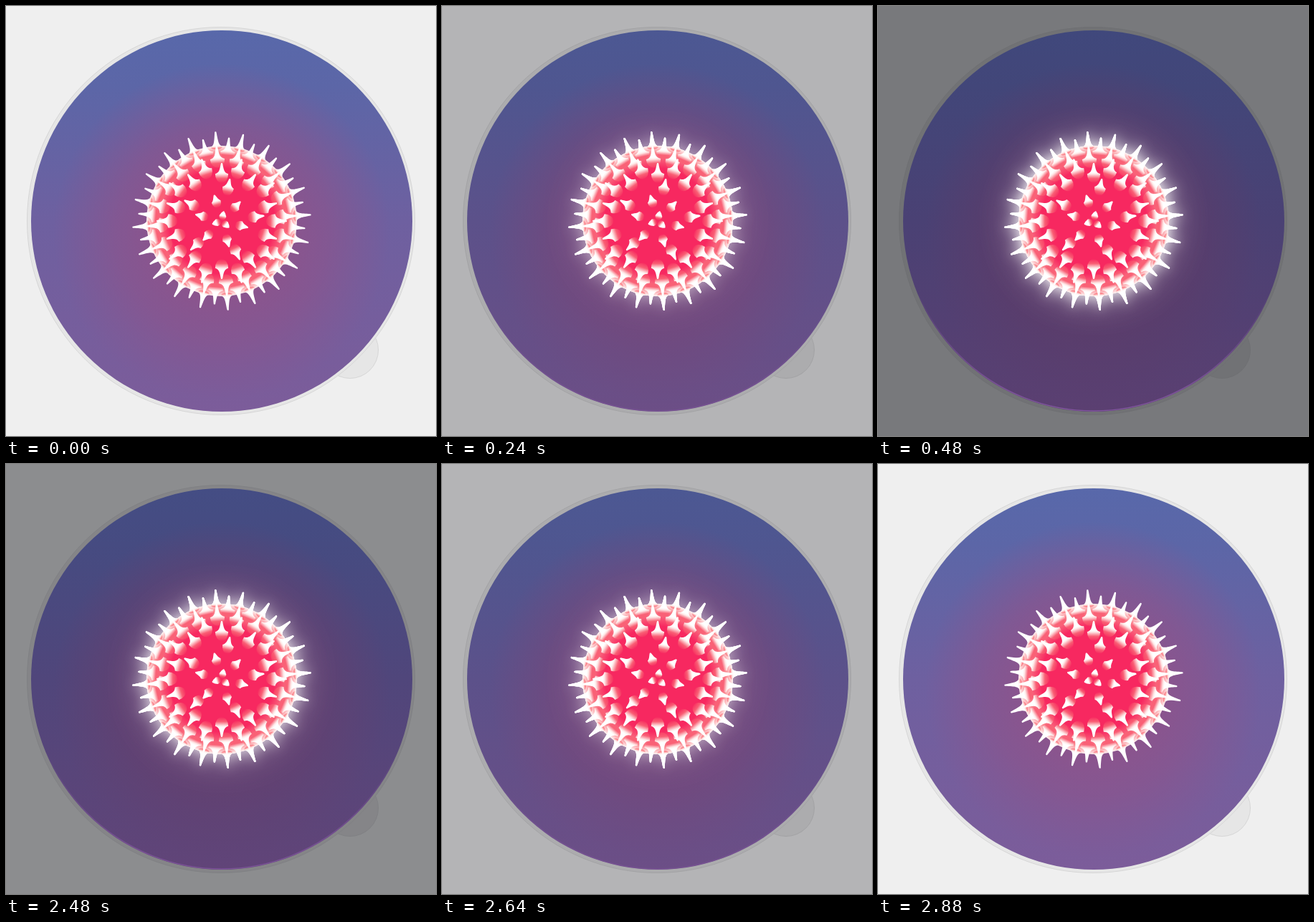
An HTML page with a canvas for the animation above (5880 ms loop, 600 by 600 pixels).

```html
<!DOCTYPE html>
<html lang="en">
<head>
<meta charset="utf-8">
<title>Glowing virus</title>
<style>
html, body { margin: 0; width: 100%; height: 100%; overflow: hidden; background: #efefef; }
canvas { display: block; width: 600px; height: 600px; }
</style>
</head>
<body>
<canvas id="stage" width="600" height="600"></canvas>
<script>
const CX = 301, CY = 300, BODY = 105, REACH = 125, LOOP = 5880;
const ctx = document.getElementById('stage').getContext('2d');

const mix = (a, b, k) => `rgb(${a.map((v, i) => Math.round(v + (b[i] - v) * k))})`;

function disc(c, x, y, r, fill) {
  c.beginPath();
  c.arc(x, y, r, 0, Math.PI * 2);
  c.fillStyle = fill;
  c.fill();
}

// Red (0) through salmon to white (1)
function tint(w) {
  return `rgb(${247 + 8 * w},${40 + 215 * w},${96 + 159 * w ** 1.5})`;
}

// A thin thorn pointing outwards, flaring into a scale that fades to red inwards.
function spike(c, angle, tip) {
  const sin = tip / REACH, z = Math.sqrt(1 - sin * sin);
  const base = tip - 5 - 16 * sin;
  const half = 4 + 8.5 * sin * (0.5 + 0.5 * Math.sqrt(z));
  const inner = base - 4 - 17 * sin * z;
  const fill = c.createLinearGradient(inner, 0, tip, 0);
  const at = (base - inner) / (tip - inner);
  const pale = 0.45 * sin ** 8;
  fill.addColorStop(0, tint(pale));
  fill.addColorStop(at * 0.5, tint(Math.max(pale, 0.25)));
  fill.addColorStop(at, tint(0.9));
  fill.addColorStop(Math.min(1, at + 0.08), '#fff');
  fill.addColorStop(1, '#fff');

  c.save();
  c.translate(CX, CY);
  c.rotate(angle);
  c.beginPath();
  c.moveTo(base, -half);
  c.bezierCurveTo(base + 2, -3.5, base + 5, -3, tip - 1, -1.2);
  c.arc(tip - 1.2, 0, 1.2, -Math.PI / 2, Math.PI / 2);
  c.bezierCurveTo(base + 5, 3, base + 2, 3.5, base, half);
  c.ellipse(base, 0, base - inner, half, 0, Math.PI / 2, Math.PI * 1.5);
  c.fillStyle = fill;
  c.fill();
  c.restore();
}

function makeVirus() {
  const canvas = document.createElement('canvas');
  canvas.width = canvas.height = 600;
  const c = canvas.getContext('2d');
  const skin = c.createRadialGradient(CX, CY, 0, CX, CY, BODY);
  skin.addColorStop(0, tint(0));
  skin.addColorStop(0.7, tint(0));
  skin.addColorStop(0.9, tint(0.4));
  skin.addColorStop(1, tint(0.95));
  disc(c, CX, CY, BODY, skin);
  // tip distance, spike count, first angle
  const rings = [
    [125, 20, 86], [117, 20, 95], [105, 20, 86], [91, 10, 72],
    [81, 10, 90], [60, 5, -79], [38, 6, -106], [14, 3, -78]
  ];
  for (const [tip, count, first] of rings)
    for (let i = 0; i < count; i++)
      spike(c, (first + i * 360 / count) * Math.PI / 180, tip);
  return canvas;
}
const virus = makeVirus();

function glow(blur, alpha) {
  ctx.shadowBlur = blur;
  ctx.shadowColor = `rgba(255,255,255,${alpha})`;
  ctx.drawImage(virus, 0, 0);
}

function draw(k) {
  ctx.fillStyle = mix([239, 239, 239], [120, 121, 124], k);
  ctx.fillRect(0, 0, 600, 600);

  // Dish rim and its tab
  const rim = mix([230, 230, 230], [113, 114, 117], k);
  ctx.strokeStyle = mix([214, 214, 214], [111, 112, 115], k);
  ctx.lineWidth = 1;
  disc(ctx, 480, 480, 39.5, rim);
  ctx.stroke();
  disc(ctx, 300, 300, 270.5, rim);
  ctx.stroke();

  const sky = ctx.createLinearGradient(0, 34, 0, 566);
  sky.addColorStop(0, mix([88, 104, 170], [64, 72, 124], k));
  sky.addColorStop(0.15, mix([92, 102, 167], [66, 70, 121], k));
  sky.addColorStop(0.5, mix([110, 96, 160], [74, 65, 116], k));
  sky.addColorStop(1, mix([124, 92, 154], [91, 63, 113], k));
  disc(ctx, CX, CY, 266, sky);

  const warm = mix([139, 84, 141], [92, 60, 106], k);
  const haze = ctx.createRadialGradient(CX, 315, 90, CX, 315, 235);
  haze.addColorStop(0, warm);
  haze.addColorStop(0.4, warm.replace('rgb', 'rgba').replace(')', ',.7)'));
  haze.addColorStop(1, warm.replace('rgb', 'rgba').replace(')', ',0)'));
  disc(ctx, CX, CY, 266, haze);

  const edge = ctx.createLinearGradient(0, 400, 0, 566);
  edge.addColorStop(0, 'rgba(130,85,160,0)');
  edge.addColorStop(1, `rgba(130,85,160,${k})`);
  ctx.beginPath();
  ctx.arc(CX, CY, 265, 0, Math.PI);
  ctx.lineWidth = 1.5;
  ctx.strokeStyle = edge;
  ctx.stroke();

  if (k > 0) {
    glow(50, 0.45 * k);
    glow(18, 0.9 * k);
  }
  ctx.shadowColor = 'transparent';
  ctx.drawImage(virus, 0, 0);
}

// Darkening moves in six steps of 80 ms, holds, then steps back.
function level(t) {
  const step = t < 2400 ? Math.floor(t / 80) : 6 - Math.floor((t - 2400) / 80);
  return Math.max(0, Math.min(6, step)) / 6;
}

const start = performance.now();
function frame() {
  draw(level((performance.now() - start) % LOOP));
  requestAnimationFrame(frame);
}
frame();
</script>
</body>
</html>
```
